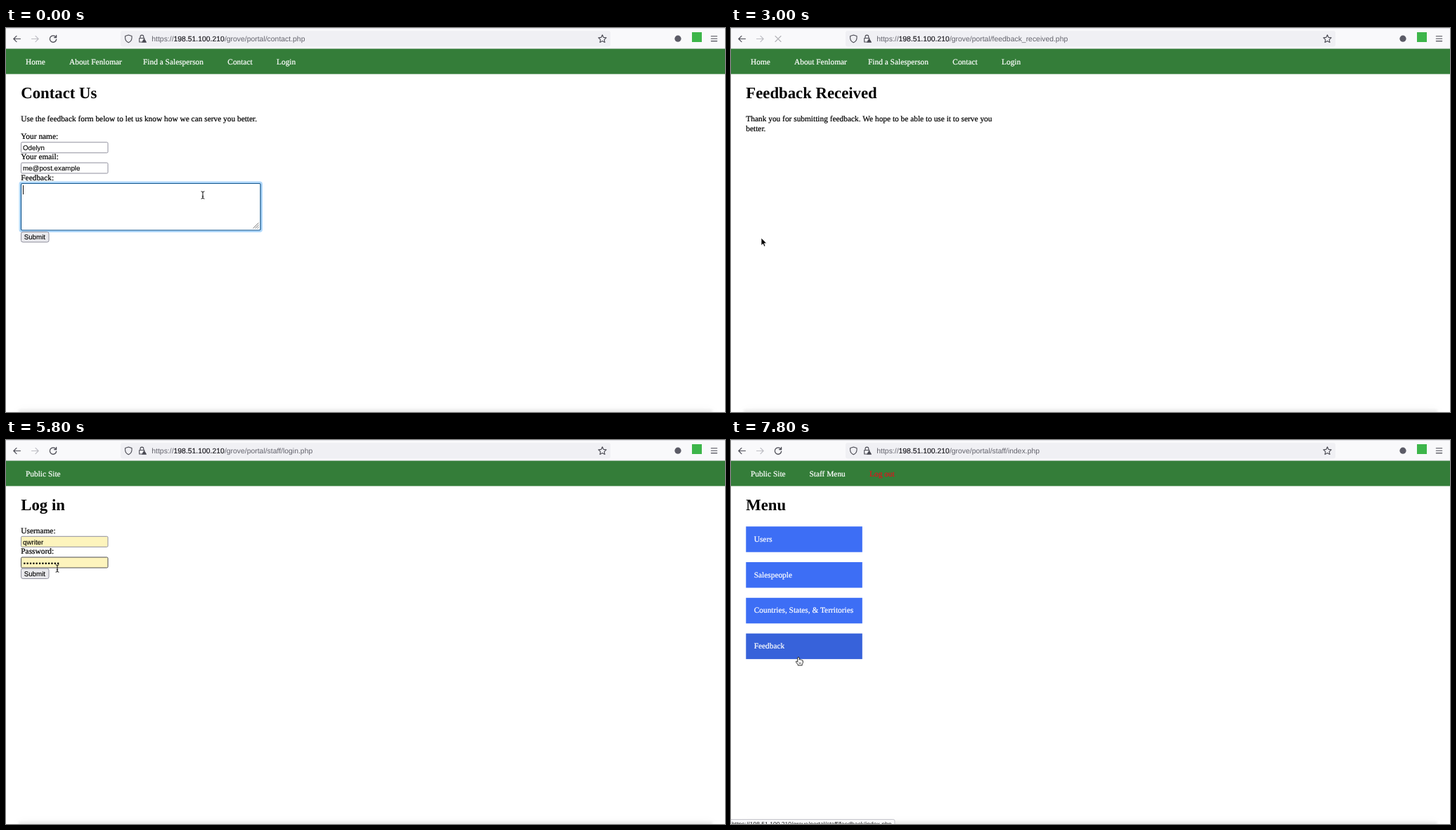
An HTML page for the animation above (8 s loop, 1023 px wide and 547 px high).

```html
<!DOCTYPE html>
<html lang="en">
<head>
<meta charset="utf-8">
<style>
  html, body { margin: 0; width: 100%; height: 100%; overflow: hidden; background: #fff; }
  svg { display: block; width: 1023px; height: 547px; }
  text { white-space: pre; color: #000; fill: currentColor; text-rendering: geometricPrecision; }
  .serif { font: 11.39px "Liberation Serif", serif; stroke: currentColor; stroke-width: .22; }
  .title { font: bold 22.76px "Liberation Serif", serif; }
  .field { font: 9.75px "Liberation Sans", sans-serif; stroke: currentColor; stroke-width: .1; }
  .url { font: 10.41px "Liberation Sans", sans-serif; color: #62626b; }
  .status { font: 8.55px "Liberation Sans", sans-serif; color: #222; }
  .mono { font: 9.27px "DejaVu Sans Mono", monospace; stroke: currentColor; stroke-width: .1; }
  .host { fill: #15141a; stroke: #15141a; stroke-width: .15; }
  .icon { fill: none; stroke: #4a4a53; stroke-width: 1.1; stroke-linecap: round; stroke-linejoin: round; }
</style>
</head>
<body>
<svg viewBox="0 0 1023 547">
  <defs>
    <filter id="soft" x="-10%" y="-300%" width="120%" height="700%"><feGaussianBlur stdDeviation="9"/></filter>
    <filter id="tight" x="-5%" y="-100%" width="110%" height="300%"><feGaussianBlur stdDeviation="1.5"/></filter>
  </defs>
  <g fill="#000">
    <rect x="18" y="549" width="987" height="20" opacity=".07" filter="url(#soft)"/>
    <rect x="18" y="543" width="987" height="20" opacity=".05" filter="url(#tight)"/>
  </g>
  <rect width="1023" height="30" fill="#f9f9fb"/>
  <path d="M0 .5H1023M0 29.2H1023" stroke="#dedee3"/>
  <rect x="163" y="4" width="697" height="22.5" rx="3" fill="#f0f0f4"/>
  <g class="icon">
    <path d="M20.5 15.5H11M15 11.3L10.8 15.5L15 19.7"/>
    <path d="M36.5 15.5H46M42 11.3L46.2 15.5L42 19.7" stroke="#bdbdc3"/>
    <path d="M174.3 10L179 11.6V14.5Q178.7 18.8 174.3 20.8Q169.9 18.8 169.6 14.5V11.6Z"/>
    <path d="M191 14.5V12.5a2.4 2.4 0 0 1 4.8 0V14.5M193.5 20H189.7V14.5H197"/>
    <path d="M196.6 15.5L199.4 20.3H193.8Z" fill="#4a4a53"/>
    <path d="M848.5 9.8L850.2 13.4L854.1 13.9L851.2 16.6L852 20.5L848.5 18.6L845 20.5L845.8 16.6L842.9 13.9L846.8 13.4Z"/>
    <path d="M1003.3 11.8H1011.7M1003.3 15.2H1011.7M1003.3 18.6H1011.7"/>
  </g>
  <circle cx="956" cy="15.2" r="4.6" fill="#5b5b66"/>
  <rect x="976" y="6" width="14" height="14" fill="#3db54a"/>
  <rect y="29.6" width="1023" height="36" fill="#347d39"/>
  <g id="view"></g>
</svg>
<script>
const LOOP = 8000, STEP = 200;
const HOST = '198.51.100.210', ROOT = '/grove/portal/';
const NAME = 'Odelyn';
const PASTE_AT = 800, BLUR_AT = 2200, LOGIN_HOVER_AT = 3600, MENU_STATUS_AT = 7000;

const mouseKeys = [
  [0, 280, 238], [1000, 280, 238], [1600, 97, 303], [2000, 43, 299], [3000, 43, 299],
  [3600, 400, 47], [5200, 400, 47], [5800, 73, 183], [6200, 46, 189], [7200, 46, 189], [7800, 96, 309]
];

const text = (x, y, s, cls = 'serif', color = '') =>
  `<text x="${x}" y="${y}" class="${cls}" style="color:${color}">${s.replace(/&/g, '&amp;').replace(/</g, '&lt;')}</text>`;
const box = (x, y, w, h, fill, stroke = 'none', rx = 0, extra = '') =>
  `<rect x="${x}" y="${y}" width="${w}" height="${h}" fill="${fill}" stroke="${stroke}" rx="${rx}" ${extra}/>`;
const path = (d, extra) => `<path d="${d}" ${extra}/>`;
const title = s => text(21.3, 100.1, s, 'title');
const nav = items => items.map(([x, s, color = '#fff']) => text(x, 52, s, 'serif', color)).join('');
const input = (y, value, fill = '#fff', stroke = '#8f8f9d') =>
  box(21.5, y, 123.5, 15, fill, stroke, 1.5) + text(24, y + 11.2, value, 'field');
const button = (y, hover) =>
  box(21.5, y, 39.5, 14.5, hover ? '#d0d0d7' : '#e9e9ed', '#8f8f9d', 2.5) + text(25.7, y + 10.5, 'Submit', 'field');

const publicNav = nav([[28, 'Home'], [90, 'About Fenlomar'], [195, 'Find a Salesperson'], [315.3, 'Contact'], [385, 'Login']]);
const between = (v, a, b) => v >= a && v <= b;

function contact(t, m) {
  const focused = t < BLUR_AT;
  let s = publicNav + title('Contact Us')
    + text(21.3, 133, 'Use the feedback form below to let us know how we can serve you better.')
    + text(21.3, 158, 'Your name:') + input(162.8, NAME)
    + text(21.3, 187.3, 'Your email:') + input(192, 'me@post.example')
    + text(21.3, 216.5, 'Feedback:');
  if (focused) s += box(20, 220, 343.5, 69.5, 'none', '#b0d8fb', 2.5, 'stroke-width="3"');
  s += box(21.5, 221.5, 340.5, 66.5, '#fff', focused ? '#12558c' : '#8f8f9d', 1.5, 'stroke-width="1.2"')
    + path('M351.5 285.5L359.5 277.5M354.5 285.5L359.5 280.5M357.5 285.5L359.5 283.5', 'stroke="#777"');
  const pasted = t >= PASTE_AT;
  if (pasted) s += text(24, 234, `<script>alert('${NAME} found the XSS!');<\/script>`, 'mono')
    + path('M108 236.2H141M203 236.2H219.5', 'stroke="#e03030" stroke-width="1.2" stroke-dasharray="1.3 1.1"');
  if (focused) s += path(`M${pasted ? 292.5 : 24.5} 224V237`, 'stroke="#111"');
  const over = between(m.x, 21, 61) && between(m.y, 291, 306);
  m.kind = between(m.x, 21, 362) && between(m.y, 221, 288) ? 'beam' : 'arrow';
  return s + button(290.5, over);
}

function received(t, m) {
  if (t >= LOGIN_HOVER_AT) {
    m.kind = 'hand';
    m.link = 'staff/index.php';
  }
  return publicNav + title('Feedback Received')
    + text(21.3, 133, 'Thank you for submitting feedback. We hope to be able to use it to serve you')
    + text(21.3, 146.7, 'better.');
}

function login(t, m) {
  const yellow = '#fdf4bd';
  m.kind = between(m.x, 21, 145) && between(m.y, 166, 184) ? 'beam' : 'arrow';
  let s = nav([[28, 'Public Site']]) + title('Log in')
    + text(21.3, 133, 'Username:') + input(137.3, 'qwriter', yellow)
    + text(21.3, 162.3, 'Password:') + input(167, '', yellow, '#4c4c50');
  for (let i = 0; i < 12; i++) s += `<circle cx="${26.3 + i * 4.35}" cy="175.7" r="1.25"/>`;
  return s + button(183, m.x < 61 && m.y > 184);
}

function menu(t, m) {
  let s = nav([[28, 'Public Site'], [111.5, 'Staff Menu'], [197, 'Log out', '#e0141f']]) + title('Menu');
  ['Users', 'Salespeople', 'Countries, States, & Territories', 'Feedback'].forEach((label, i) => {
    const y = 123.2 + i * 50.8, over = between(m.y, y, y + 36.5);
    if (over) {
      m.kind = 'hand';
      if (t >= MENU_STATUS_AT) m.link = `staff/${label.toLowerCase().split(',')[0]}/index.php`;
    }
    s += box(21.3, y, 165.5, 36.5, over ? '#3762da' : '#3d6ef5') + text(32.7, y + 21.6, label, 'serif', '#fff');
  });
  return s;
}

const pages = [
  { start: 0, file: 'contact.php', draw: contact },
  { start: 2600, file: 'feedback_received.php', draw: received },
  { start: 5200, file: 'staff/login.php', draw: login },
  { start: 6600, file: 'staff/index.php', draw: menu }
];

const cursors = {
  arrow: path('M0 0V10.8L2.5 8.5L4.2 12.3L6 11.5L4.4 7.8H7.8Z', 'fill="#000" stroke="#fff" stroke-width=".8"'),
  beam: path('M-2.4 -5.2Q0 -5.2 0 -3.8Q0 -5.2 2.4 -5.2M0 -4V4M-2.4 5.2Q0 5.2 0 3.8Q0 5.2 2.4 5.2M-1.2 1.8H1.2', 'fill="none" stroke="#111"'),
  hand: path('M-1.2 1Q0 -.6 1.2 1V4Q2.4 3.2 3.2 4.2Q4.5 3.7 5 4.8Q6.3 4.6 6.3 6V8.5L5.2 10.5V12H-.8V10.8L-3.6 7.3Q-3.7 5.8 -2.3 6.2L-1.2 7.3Z', 'fill="#fff" stroke="#111" stroke-width=".9"')
    + path('M1.2 7.8V10.2M3 7.8V10.2', 'stroke="#111" stroke-width=".7"')
};

function mouseAt(t) {
  const i = mouseKeys.findIndex(k => k[0] > t);
  const b = mouseKeys[i < 0 ? mouseKeys.length - 1 : i], a = i < 0 ? b : mouseKeys[i - 1];
  const u = a === b ? 0 : (t - a[0]) / (b[0] - a[0]), e = u * u * (3 - 2 * u);
  return { x: a[1] + (b[1] - a[1]) * e, y: a[2] + (b[2] - a[2]) * e, kind: 'arrow', link: '' };
}

// A cross shows while a page loads and stays dimmed shortly after it arrives.
function reloadIcon(t) {
  const loads = pages.slice(1);
  const loading = loads.some(p => between(t, p.start - 400, p.start - 1));
  const dim = loads.some(p => between(t, p.start, p.start + 400));
  return loading || dim
    ? path('M63 11.5L71 19.5M71 11.5L63 19.5', `class="icon" ${dim ? 'stroke-opacity=".4"' : ''}`)
    : path('M70.8 12.7A4.7 4.7 0 1 0 71.7 16.2M71.6 10.5V13.6H68.5', 'class="icon" style="stroke-width:1.3"');
}

function draw(t) {
  const m = mouseAt(t), page = pages.findLast(p => t >= p.start);
  let s = `<text x="207.3" y="19" class="url">https://<tspan class="host">${HOST}</tspan>${ROOT}${page.file}</text>`
    + reloadIcon(t) + page.draw(t, m);
  if (m.link) {
    const width = 196 + (m.link.length - 15) * 4.1;
    s += box(-2, 540.5, width + 2, 12, '#f9f9fb', '#c4c4ca', 2) + text(1, 550, `https://${HOST}${ROOT}${m.link}`, 'status');
  }
  return s + `<g transform="translate(${m.x} ${m.y})">${cursors[m.kind]}</g>`;
}

const view = document.getElementById('view');
let shown = -1;
function tick() {
  const t = Math.floor(performance.now() % LOOP / STEP) * STEP;
  if (t !== shown) view.innerHTML = draw(shown = t);
  requestAnimationFrame(tick);
}
tick();
</script>
</body>
</html>
```
